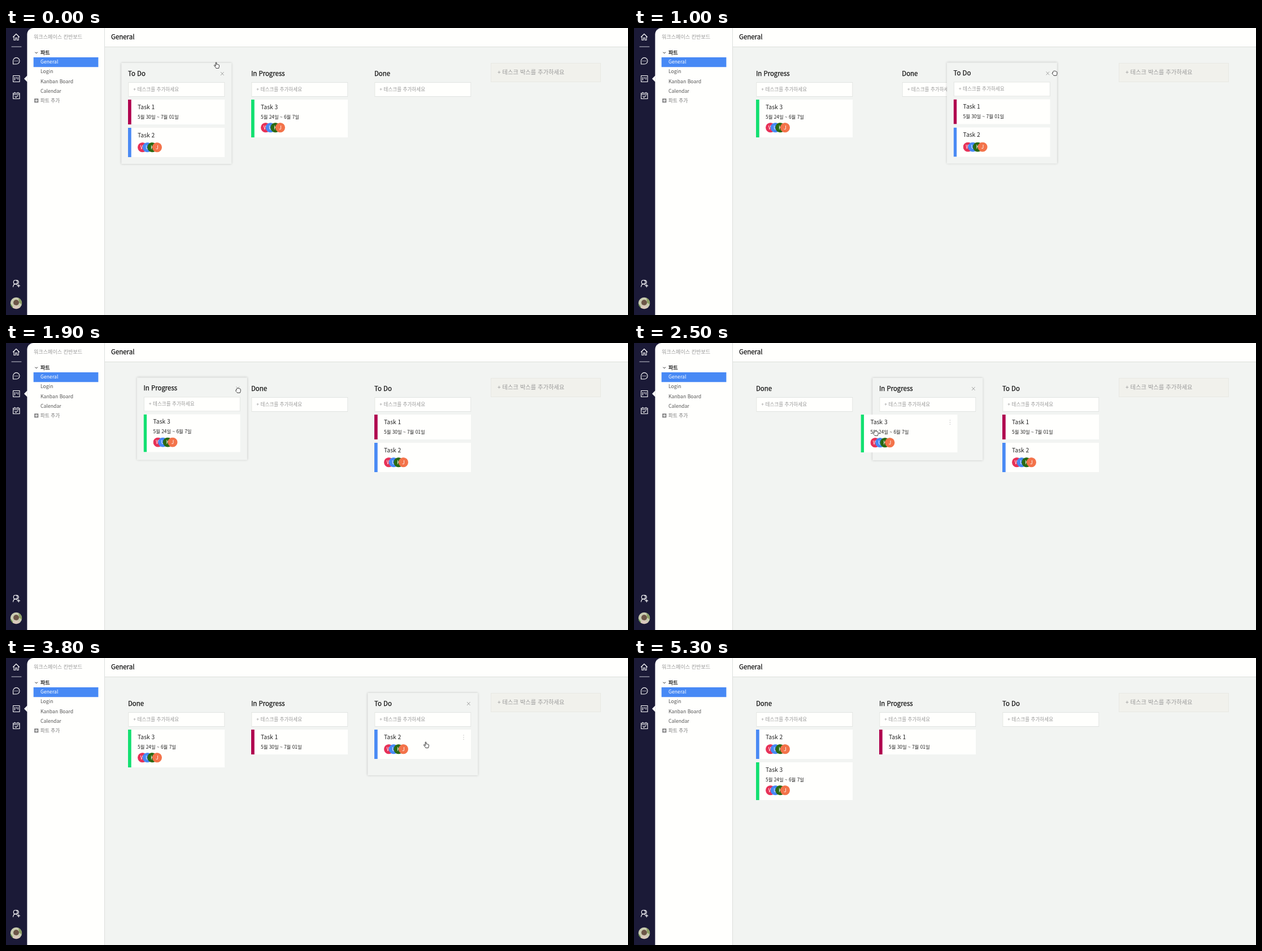
Write an HTML page that moves like this. It is 1101 px wide and 509 px high and loops after 5.8 s.

```html
<!DOCTYPE html>
<html lang="ko">
<head>
<meta charset="utf-8">
<title>Kanban board</title>
<style>
html, body { margin: 0; width: 100%; height: 100%; overflow: hidden; }
body { position: relative; background: #f2f4f2; font-family: "Noto Sans CJK KR", "Noto Sans KR", "Noto Sans", sans-serif; }
div, svg, span { position: absolute; box-sizing: border-box; }
span { line-height: 20px; white-space: nowrap; }
.strong { -webkit-text-stroke: .25px; }
#head { left: 175px; top: 0; width: 926px; height: 34px; background: #fffffd; border-bottom: 1px solid #dcdfdc; }
#add { left: 858px; top: 62px; width: 195px; height: 34px; background: #f1f1ec; border: 1px solid #e8e9e4; }
#frame { left: 0; top: 0; }
#board { left: 0; top: 0; width: 1101px; height: 509px; overflow: hidden; }
.col { left: 0; top: 0; width: 195px; }
.col.on { background: #f2f4f2; box-shadow: 0 0 4px rgba(0, 0, 0, .2); }
.input { left: 12px; top: 34px; width: 171px; height: 26px; background: #fffffd; border: 1px solid #e1e4e1; }
.close { left: 174.5px; top: 15px; }
.card { left: 0; top: 0; width: 171px; background: #fffffd; }
.bar { left: 0; top: 0; }
.faces { left: 17px; font-size: 9px; font-weight: 300; text-anchor: middle; }
.dots { left: 156px; top: 8px; }
#scroll { left: 383px; top: 125px; width: 4px; height: 117px; background: #d9dbd9; z-index: 3; }
#hand { left: 0; top: 0; z-index: 9; overflow: visible; }
</style>
</head>
<body>
<div id="head"></div>
<div id="add"></div>
<svg id="frame" width="175" height="509" fill="none" stroke="#fff" stroke-width="1.1" stroke-linecap="round" stroke-linejoin="round">
  <defs>
    <clipPath id="round"><circle cx="18" cy="488" r="10.2"/></clipPath>
  </defs>
  <g stroke="none">
    <path d="M0 0H60V509H0Z" fill="#1b1a37"/>
    <path d="M37.400 509V11.500a11.500 11.500 0 0 1 11.500-11.500H174V509Z" fill="#fffffd"/>
    <path d="M174 0h1V509h-1Z" fill="#dcdfdc"/>
    <path d="M48.700 52.100h114.700v17.200H48.700Z" fill="#4789f5"/>
    <path d="M32 90 37.700 84.300V95.700Z" fill="#fffffd"/>
  </g>
  <path d="M12.500 16 18 10.500 23.500 16M14 15v6.500h2.700v-4h2.600v4H22V15"/>
  <path d="M10 33.200H27" stroke="#c9c9d2" stroke-width="1"/>
  <path d="M12.600 64V58.300a5.700 5.700 0 1 1 5.700 5.700Z"/>
  <path d="M15.700 58.500h.1M18.300 58.500h.1M20.900 58.500h.1" stroke-width="1.300"/>
  <path d="M12.700 84.500H24v11H12.700ZM15.500 87.500v5M18.300 87.500v2M21.100 87.500v3.500"/>
  <path d="M12.700 115.500H24v10H12.700ZM12.700 118H24M15.500 114v1.500M21.200 114v1.500M16 121.500l1.700 1.700 3-3"/>
  <circle cx="16.700" cy="450.700" r="3.400"/>
  <path d="M12.600 459c.3-3 2-4.900 4.300-4.900 1.200 0 2.200.5 3 1.500M18.500 447.400a3.300 3.300 0 0 1 1.800 6.300M22.300 454.800v4.600M20 457.100h4.600"/>
  <g clip-path="url(#round)" stroke="none">
    <path d="M7 477h22v22H7Z" fill="#c9cbb0"/>
    <path d="M22 477h7v14l-6-4Z" fill="#8da066"/>
    <path d="M7 487l8 12H7Z" fill="#5f8c3f"/>
    <ellipse cx="18" cy="487" rx="5" ry="5" fill="#6d5648"/>
    <path d="M11 499c1-7 4-8 8-7s6 3 7 7Z" fill="#d9c8bc"/>
  </g>
  <path d="M51.700 43 53.700 45 55.700 43" stroke="#222" stroke-width="1"/>
  <rect x="50" y="125" width="7.500" height="7.500" rx="1" fill="#8d8d8d" stroke="none"/>
  <path d="M51.700 128.750h4.100M53.750 126.700v4.100" stroke-width="1"/>
</svg>
<div id="board">
  <div id="scroll"></div>
  <svg id="hand" width="14" height="14" fill="#fff" stroke="#222" stroke-width=".9" stroke-linejoin="round" stroke-linecap="round">
    <path id="point" d="M-1.900 1.200V-4.200c0-1.300 1.700-1.300 1.700 0V-1.300c.4-.7 1.500-.5 1.600.3 .5-.6 1.400-.3 1.500.4 .7-.5 1.500 0 1.500.8V2C4.400 3.600 3.600 4 3.500 5.400H-1.200C-1.500 4-3.600 2.300-4.500.7c-.5-1 .7-1.700 1.400-.9Z"/>
    <path id="fist" d="M-2.900-.6C-3.300-2.600-2.300-3.900-1.300-3.100-.9-4.300.6-4.200.9-3.200 1.600-4 2.700-3.500 2.700-2.600 3.600-3 4.400-2.400 4.400-1.400V1.200C4.400 2.500 3.500 3 3.400 4.300H-1.500C-1.700 3.100-3.600 2.300-4.200.9-4.600-.2-3.700-1-2.900-.6Z"/>
  </svg>
</div>
<script>
const LOOP = 5800, STEP = 100;
const LAG = 50;                       // the page follows the pointer this late
const SLOT = 218, COL_X = 204.3, COL_Y = 62, COL_W = 195;
const CARD_X = 216, CARD_Y = 127, CARD_W = 171, GAP = 6;

const $ = id => document.getElementById(id);
const board = $('board'), hand = $('hand');

// Building

function el(parent, cls, css = {}) {
  const node = document.createElement('div');
  node.className = cls;
  Object.assign(node.style, css);
  parent.append(node);
  return node;
}

function text(parent, str, x, midY, size, color, cls = '') {
  const node = document.createElement('span');
  node.className = cls;
  node.textContent = str;
  node.style.cssText = `left:${x}px;top:${midY - 10.6}px;font-size:${size}px;color:${color}`;
  parent.append(node);
}

function svg(parent, cls, w, h, body) {
  parent.insertAdjacentHTML('beforeend', `<svg class="${cls}" width="${w}" height="${h}">${body}</svg>`);
  return parent.lastElementChild;
}

function makeCol(title, slot) {
  const node = el(board, 'col');
  text(node, title, 11.7, 18.3, 11.4, '#111', 'strong');
  text(el(node, 'input'), '+ 테스크를 추가하세요', 8, 12, 8.6, '#999');
  const close = svg(node, 'close', 7, 8, '<path d="M.7 1 6.300 7M6.300 1 .7 7" stroke="#999" stroke-width=".9"/>');
  return { node, close, slot };
}

const people = { W: '#e73257', U: '#4789f5', K: '#2a6a14', J: '#f3734a' };
const faces = Object.entries(people).map(([letter, fill], i) => {
  const x = 8.6 * (i + 1);
  return `<circle cx="${x}" cy="8.600" r="8.600" fill="${fill}"/><text x="${x}" y="11.800" fill="#fff">${letter}</text>`;
}).join('');

function makeCard(title, date, color, height, home, top) {
  const node = el(board, 'card', { height: height + 'px' });
  svg(node, 'bar', 6, height, `<path d="M0 0H5.730V${height}H0Z" fill="${color}"/>`);
  text(node, title, 17, 14, 10.3, '#222');
  if (date) text(node, date, 17, 30.7, 8.37, '#222');
  if (height > 50) svg(node, 'faces', 44, 18, faces).style.top = height - 25.6 + 'px';
  const dots = svg(node, 'dots', 4, 12, '<path d="M2 2v.1M2 5.600v.1M2 9.200v.1" stroke="#bbb" stroke-width="1.400" stroke-linecap="round"/>');
  return { node, dots, height, home, top };
}

const page = document.body;
text(page, '워크스페이스 칸반보드', 49, 16, 9.1, '#999');
text(page, '파트', 61, 44, 9.1, '#111', 'strong');
['General', 'Login', 'Kanban Board', 'Calendar'].forEach((s, i) =>
  text(page, s, 61, 60.7 + i * 17.2, 8.7, i ? '#555' : '#fff'));
text(page, '파트 추가', 61, 129, 8.6, '#777');
text(page, 'General', 186, 15.2, 11.47, '#111', 'strong');
text(page, '+ 테스크 박스를 추가하세요', 870, 78.3, 10.3, '#999');

const todo = makeCol('To Do', 0);
const prog = makeCol('In Progress', 1);
const done = makeCol('Done', 2);
const cols = [todo, prog, done];

const task1 = makeCard('Task 1', '5월 30일 ~ 7월 01일', '#b0034f', 44, todo, 0);
const task2 = makeCard('Task 2', '', '#4a8af4', 52, todo, 44 + GAP);
const task3 = makeCard('Task 3', '5월 24일 ~ 6월 7일', '#13e071', 67, prog, 0);
const cards = [task1, task2, task3];

// Motion

const unit = v => Math.min(1, Math.max(0, v));
const smooth = k => k * k * (3 - 2 * k);
const snap = k => 1 - (1 - k) ** 3;

// Drags by hand: slots moved, time held, sag on the way, where the part is gripped.
const drags = [
  { part: todo, t: 600, dur: 560, slots: 2, grip: [148, 18] },
  { part: prog, t: 1800, dur: 450, slots: -1 + 2, grip: [150, 22] },
  { part: task3, t: 2400, dur: 410, slots: -1, grip: [60, 33] },
  { part: task1, t: 3000, dur: 575, slots: -1, hold: 600, sag: 3, grip: [79, 21] },
  { part: task2, t: 3900, dur: 430, slots: -2, hold: 800, sag: 32, grip: [92, 27] },
];
drags.forEach(d => { d.end = d.t + (d.hold || d.dur); });

// Parts that make room: a quick shift by some slots sideways or pixels down.
const shifts = [
  { part: prog, t: 780, slots: -1 },
  { part: done, t: 914, slots: -1 },
  { part: done, t: 2050, slots: -1 },
  { part: task2, t: 3293, down: -(44 + GAP) },
  { part: task3, t: 4203, down: 52 + GAP },
];

const held = (part, t) => drags.some(d => d.part === part && t >= d.t && t < d.end);

function offset(part, t) {
  let x = 0, y = 0;
  for (const d of drags) if (d.part === part) {
    x += SLOT * d.slots * smooth(unit((t - d.t) / d.dur));
    y += (d.sag || 0) * Math.sin(Math.PI * unit((t - d.t) / (d.end - d.t)));
  }
  for (const s of shifts) if (s.part === part) {
    const k = snap(unit((t - s.t) / 200));
    x += SLOT * (s.slots || 0) * k;
    y += (s.down || 0) * k;
  }
  return [x, y];
}

function place(part, t) {
  const [x, y] = offset(part, t);
  if (!part.home) return [COL_X + SLOT * part.slot + x, COL_Y + y];
  // A card rides on its first column until it is taken out.
  const taken = drags.find(d => d.part === part).t;
  const [colX] = place(part.home, Math.min(t, taken));
  return [colX + CARD_X - COL_X + x, CARD_Y + part.top + y];
}

const grip = (d, t) => place(d.part, t).map((v, i) => v + d.grip[i]);

// The pointer rests at these stops and glides between them, except while dragging.
const stops = [[100, 373, 66]];
for (const d of drags) stops.push([d.t - 100, ...grip(d, d.t)], [d.end, ...grip(d, d.end)]);
stops.push([4900, ...stops[stops.length - 1].slice(1)], [5250, 197, 170]);

function pointer(t) {
  const d = drags.find(d => t >= d.t && t < d.end);
  if (d) return grip(d, t + LAG);
  const i = stops.findIndex(s => s[0] > t);
  if (i < 1) return stops[i ? stops.length - 1 : 0].slice(1);
  const [t0, x0, y0] = stops[i - 1], [t1, x1, y1] = stops[i];
  const k = smooth((t - t0) / (t1 - t0));
  return [x0 + (x1 - x0) * k, y0 + (y1 - y0) * k];
}

// Drawing

const show = (node, on) => { node.style.display = on ? '' : 'none'; };
const move = (node, x, y) => { node.style.transform = `translate(${x}px,${y}px)`; };
const inside = (v, from, size) => v >= from && v < from + size;

function draw(t) {
  const [seenX, seenY] = pointer(t - LAG);
  const scrolling = inside(t, 4200, 500);
  const drag = drags.find(d => t >= d.t && t < d.end);

  for (const col of cols) {
    const [x, y] = place(col, t);
    const lifted = held(col, t);
    const on = lifted || !cols.includes(drag && drag.part) && inside(seenX, x, COL_W);
    const tall = col === todo && t < 3500 ? 179 : 146;
    col.node.classList.toggle('on', on);
    col.node.style.height = (col === done && t >= 4200 ? scrolling ? 191 : 203 : tall) + 'px';
    col.node.style.zIndex = lifted ? 3 : 1;
    show(col.close, on);
    move(col.node, x, lifted ? y - .6 : y);
  }

  for (const card of cards) {
    const [x, y] = place(card, t);
    const riding = held(card.home, t) && t < drags.find(d => d.part === card).t;
    const over = inside(seenX, x, CARD_W) && inside(seenY, y, card.height);
    card.node.style.zIndex = held(card, t) ? 5 : riding ? 4 : 2;
    show(card.dots, over && (!drag || t - drag.t <= STEP));
    move(card.node, x, riding ? y - .6 : y);
    const cut = Math.max(0, y + card.height - 242);
    card.node.style.clipPath = scrolling && card === task3 ? `inset(0 0 ${cut}px 0)` : 'none';
  }

  show($('scroll'), scrolling);
  show(hand, t < 5300);
  show($('point'), !drag);
  show($('fist'), drag);
  move(hand, ...pointer(t));
}

const start = performance.now();
function tick() {
  const t = (performance.now() - start) % LOOP;
  draw(Math.floor(t / STEP) * STEP);
  requestAnimationFrame(tick);
}
tick();
</script>
</body>
</html>
```
